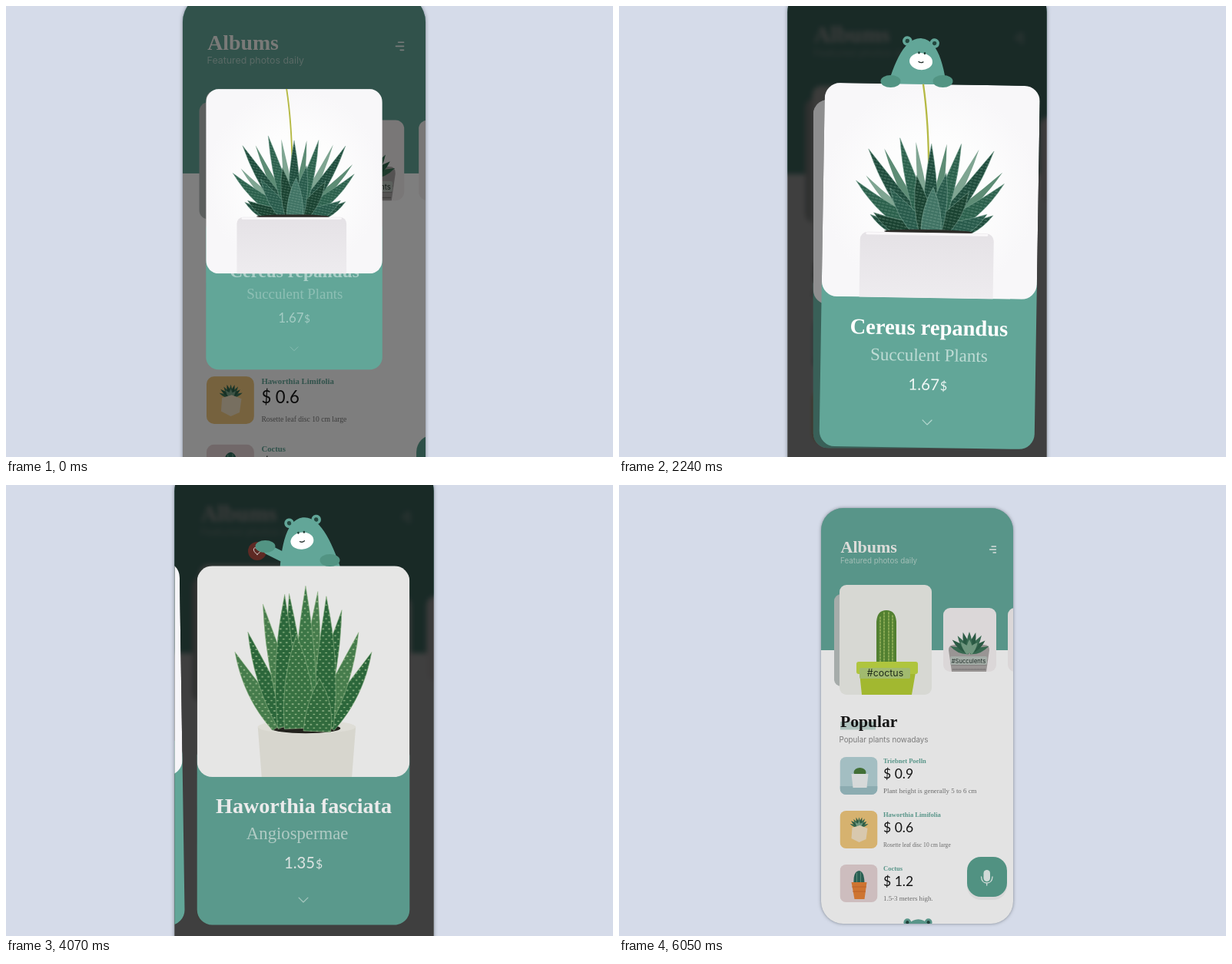
An HTML page that plays this animation: 790 px wide and 587 px high, repeating every 6150 ms.

```html
<!DOCTYPE html>
<html lang="en">
<head>
<meta charset="utf-8">
<title>Plant albums</title>
<style>
html, body { margin: 0; width: 100%; height: 100%; overflow: hidden; background: #d5dbe9; }
svg { display: block; }
.serif { font-family: "Liberation Serif", serif; }
.bold { font-weight: bold; }
.sans { font-family: Inter, sans-serif; }
.num { font-family: Lato, sans-serif; }
.mid { text-anchor: middle; }
.line { fill: none; stroke-linecap: round; stroke-linejoin: round; }
</style>
</head>
<body>
<svg id="stage" width="790" height="587" viewBox="0 0 790 587"></svg>
<script>
const LOOP = 6150, GREEN = '#62a698', PAW = '#529483';

// ---------- drawing helpers ----------
const rect = (x, y, w, h, fill, r = 0, more = '') =>
  `<rect x="${x}" y="${y}" width="${w}" height="${h}" rx="${r}" fill="${fill}" ${more}/>`;
const oval = (x, y, rx, ry, fill) =>
  `<ellipse cx="${x}" cy="${y}" rx="${rx}" ry="${ry}" fill="${fill}"/>`;
const path = (d, fill, more = '') => `<path d="${d}" fill="${fill}" ${more}/>`;
const line = (d, color, w, more = '') =>
  `<path class="line" d="${d}" stroke="${color}" stroke-width="${w}" ${more}/>`;
const text = (x, y, size, fill, cls, str) =>
  `<text x="${x}" y="${y}" font-size="${size}" fill="${fill}" class="${cls}">${str}</text>`;
const place = (x, y, s, art) => `<g transform="translate(${x} ${y}) scale(${s})">${art}</g>`;

let seed = 7;
const random = () => (seed = seed * 16807 % 2147483647) / 2147483647;

// A tapering leaf of base width w, bowed sideways by bow
function leaf(x0, y0, x1, y1, w, bow, fill, pattern) {
  const len = Math.hypot(x1 - x0, y1 - y0);
  const nx = (y0 - y1) / len, ny = (x1 - x0) / len;
  const at = (x, y, k) => `${(x + nx * k).toFixed(1)} ${(y + ny * k).toFixed(1)}`;
  const mx = (x0 + x1) / 2, my = (y0 + y1) / 2;
  const d = `M${at(x0, y0, -w / 2)}Q${at(mx, my, bow - w * .55)} ${x1.toFixed(1)} ${y1.toFixed(1)}` +
    `Q${at(mx, my, bow + w * .55)} ${at(x0, y0, w / 2)}Z`;
  return path(d, fill) + (pattern ? path(d, `url(#${pattern})`) : '');
}

// Leaves spread evenly over +-spread degrees, outer ones behind the middle
function fan({ x = 0, y, n, spread, len, w, foot = 0, bow = 0, fills, pattern }) {
  const list = Array.from({ length: n }, (_, i) => ({ i, k: n > 1 ? 2 * i / (n - 1) - 1 : 0 }));
  list.sort((a, b) => Math.abs(b.k) - Math.abs(a.k));
  return list.map(({ i, k }) => {
    const a = k * spread * Math.PI / 180, r = len(a) * (.95 + .1 * random());
    return leaf(x + k * foot, y, x + r * Math.sin(a), y - r * Math.cos(a), w, bow * k, fills[i % fills.length], pattern);
  }).join('');
}

// ---------- photos on the big cards, top centre at 0,0 ----------
const fullFan = a => 114 + 24 * Math.sin(2 * a) ** 2 - 42 * Math.sin(a) ** 4;
const rosette = rect(-140, 0, 280, 278, 'url(#wall)') +
  line('M-12 0Q-4 50 -3 115', '#b5b943', 2.3) +
  fan({ y: 186, n: 6, spread: 52, len: a => fullFan(a) * .94, w: 13, foot: 12, bow: 7, fills: ['#7fa592', '#5d8c75'] }) +
  `<g stroke="#86ad9b" stroke-opacity=".45" stroke-width=".7">` +
  fan({ y: 190, n: 9, spread: 76, len: fullFan, w: 20, foot: 16, bow: 13, fills: ['#1d4a3b', '#2a5f4b'], pattern: 'stripes' }) +
  fan({ y: 192, n: 6, spread: 72, len: () => 76, w: 23, foot: 14, bow: 10, fills: ['#18402f', '#27594a'], pattern: 'stripes' }) +
  leaf(1, 192, 3, 134, 26, 0, '#3f7263', 'stripes') + '</g>' +
  oval(-2, 192, 58, 3, '#2b2a26') + rect(-91, 193, 174, 110, 'url(#pot)', 10) +
  line('M-82 195H74', '#faf8fa', 3);

const gasteria = rect(-140, 0, 280, 278, '#f6f5f8') +
  path('M-48 188H75L60 258Q58 268 48 268H-22Q-32 268 -34 258Z', '#fdfcfe') +
  oval(13, 188, 61, 6, '#dcdadf') +
  `<g stroke="#86ad9b" stroke-opacity=".6" stroke-width="1">` +
  leaf(2, 190, -70, 90, 20, 22, '#1f5141', 'stripes') + leaf(-2, 186, 104, 74, 22, -32, '#24513f', 'stripes') +
  leaf(8, 184, 88, 162, 17, -13, '#1f4a3c', 'stripes') + leaf(10, 186, 84, 176, 14, 3, '#193f33') + '</g>' +
  Array.from({ length: 7 }, (_, i) => oval(-24 + i * 8, 187 + 3 * random(), 5, 4, '#fff')).join('');

const tallFan = a => 190 - 84 * Math.abs(a);
const haworthia = rect(-140, 0, 280, 278, '#f9f9f8') +
  path('M-60 212H69L63 290H-54Z', '#e9e8df') + oval(4.5, 212, 64.5, 9, '#f1f0e8') +
  oval(3, 214, 46, 6.5, '#26251f') + `<g stroke="#a8cc9c" stroke-opacity=".45" stroke-width=".7">` +
  fan({ y: 210, n: 8, spread: 43, len: tallFan, w: 25, foot: 30, bow: 9, fills: ['#4c8652', '#2f6f3f'], pattern: 'dots' }) +
  fan({ x: 3, y: 212, n: 3, spread: 9, len: () => 178, w: 30, foot: 22, bow: 5, fills: ['#2f6f3f', '#41804c'], pattern: 'dots' }) +
  leaf(-4, 214, -9, 90, 42, -1, '#3d7b48', 'dots') + leaf(18, 218, 21, 148, 36, 3, '#357342', 'dots') + '</g>';

const heart = line('M0 9C-16 -2 -9 -12 -3 -8Q-1 -7 0 -5Q1 -7 3 -8C9 -12 16 -2 0 9Z', '#fff', 1.6);

const card = (id, title, family, fx, price, art) =>
  `<g id="${id}"><g class="panel">${rect(-140, 230, 280, 243, GREEN, 20)}<g class="info">` +
  text(.5, 326, 28.5, '#fff', 'serif bold mid', title) +
  text(fx, 360, 23, '#bfdcd5', 'serif mid', family) +
  text(0, 398, 20.5, '#eef6f4', 'num mid', `${price}<tspan font-size="16" dx="1">$</tspan>`) +
  line('M-6 437L0 443L6 437', '#b5d8cf', 1.2) +
  `</g></g><g class="photo"><g clip-path="url(#frame)">${art}</g></g>` +
  rect(-140, 0, 280, 473, '#000', 20, 'class="dim" opacity="0"') +
  `<g class="like" opacity="0">${oval(16, 48, 25, 25, '#f3d5d4')}${place(16, 48, 1, heart)}</g></g>`;

// ---------- bear ----------
const ear = x => oval(x, 47, 6.3, 6.3, GREEN) + oval(x, 47, 2.7, 2.7, '#24483f');
const eye = x => oval(x, 61, 1.3, 1.6, '#1d3a33');
const head = ear(372.5) + ear(408) +
  path('M349 124C356 82 367 42 391 42C414 42 426 82 433 124Z', GREEN);
const face = oval(390, 72, 15, 11, '#fff') + eye(386.5) + eye(394) +
  line('M387 72.5Q390 74.5 393 72.5', '#24302d', 1.3);

// ---------- phone screen ----------
const succulent =
  fan({ y: 20, n: 9, spread: 76, len: () => 27, w: 9, bow: 4, fills: ['#3d7459', '#2f634b'] }) +
  fan({ y: 22, n: 3, spread: 40, len: () => 18, w: 9, fills: ['#7ba78c'] });

const thumbs = [
  rect(0, 38, 49, 11, '#9cbfc5') + oval(26, 20, 8, 6, '#4a7b3c') +
    path('M15 22H37L35 40H17Z', '#eef1f1'),
  place(25, 11, .45, succulent) + path('M16 22L26 19L36 23L34 37L25 41L15 36Z', '#f0dfc2'),
  path('M18 25Q17 9 25 8Q32 9 32 25Z', '#2f6a5c') + line('M22 11V24M27 10V24', '#6b9c86', 1) +
    path('M15 23H35L32 45H19Z', '#e58137') + line('M16 29H34M17 35H33', '#c9652a', .8)
];
const row = (i, bg, name, price, info, size) => place(287.5, 354 + 70 * i, 1,
  `<g clip-path="url(#thumb)">${rect(0, 0, 49, 49, bg)}${thumbs[i]}</g>` +
  text(56.5, 7.5, 8.5, GREEN, 'serif bold', name) +
  text(56.5, 27.5, 17.5, '#161616', 'num', `$ ${price}`) +
  text(56.5, 46.5, size, '#777', 'serif', info));
const smallPhoto = (x, art) => place(x, 160, 1, rect(0, 0, 69, 83, '#f4eff0', 9) + art);

const screen = rect(200, 0, 380, 700, '#fdfdfd') + rect(200, 0, 380, 215, GREEN) +
  text(288.5, 88, 22, '#f5f5f2', 'serif bold', 'Albums') +
  text(288, 102, 9.8, '#b4d3cb', 'sans', 'Featured photos daily') +
  line('M485 80H490.5M482.5 84H490.5M487 88H490.5', '#f2f7f6', 1.3) +
  rect(280, 142, 110, 120, '#b9bfbd', 9) +
  rect(287, 130, 120, 143, '#eff0eb', 9) +
  path('M335 238V178Q336 163 348 163Q360 163 361 178V238Z', '#5b8f37') +
  line('M340 172V232M345 166V232M351 166V232M356 170V232', '#a7c765', 1.6, 'stroke-dasharray="2 2"') +
  path('M313 244H386L381 273H316Z', '#b4cd35') + rect(309, 230, 80, 16, '#c3db45', 3) +
  rect(313, 238, 66, 14, '#b3cf7c', 2) +
  text(346.5, 249, 12.4, '#22301c', 'sans mid', '#coctus') +
  smallPhoto(422, path('M7 55Q7 48 14 48H54Q60 48 60 55L56 83H11Z', '#aaa6a5') +
    line('M10 68H57M11 74H56M12 80H55', '#7f7b7a', 1.2, 'stroke-dasharray="3 1"') +
    place(34, 37, .95, succulent) + rect(9, 63, 48, 11, '#b7c0ba', 2) +
    text(33, 71.5, 7.6, '#20302a', 'sans mid', '#Succulents')) +
  smallPhoto(506, '') +
  rect(288, 308, 46, 10.5, '#c3d9d4') +
  text(288, 315, 21.6, '#161616', 'serif bold', 'Popular') +
  text(286.5, 334.5, 9.8, '#888', 'sans', 'Popular plants nowadays') +
  row(0, '#b5d3d8', 'Triebnet Poelln', '0.9', 'Plant height is generally 5 to 6 cm', 8.9) +
  row(1, '#eec67c', 'Haworthia Limifolia', '0.6', 'Rosette leaf disc 10 cm large', 7.6) +
  row(2, '#e4d2d4', 'Coctus', '1.2', '1.5-3 meters high.', 8.9) +
  `<g id="mic">${rect(453, 488, 52, 52, '#000', 18, 'opacity=".05"')}${rect(453, 484, 52, 52, '#5aa291', 18)}` +
  rect(474.5, 501, 8.5, 15, '#e9f3f0', 4.2) +
  line('M471.5 510Q472 518 478.7 518Q485.5 518 486 510M478.7 518V521', '#e9f3f0', 1.3) + '</g>' +
  place(88.5, 533, .77, head);

document.getElementById('stage').innerHTML = `<defs>
  <clipPath id="shell">${rect(263, 30, 250, 541, '#000', 29)}</clipPath>
  <clipPath id="window">${rect(219.5, 0, 337.5, 587, '#000')}</clipPath>
  <clipPath id="frame">${rect(-140, 0, 280, 278, '#000', 20)}</clipPath>
  <clipPath id="thumb">${rect(0, 0, 49, 49, '#000', 8)}</clipPath>
  <radialGradient id="wall"><stop offset=".5" stop-color="#fdfdfd"/><stop offset="1" stop-color="#f8f7f9"/></radialGradient>
  <linearGradient id="pot" x2="0" y2="1"><stop stop-color="#e5e2e6"/><stop offset=".8" stop-color="#eeecef"/></linearGradient>
  <pattern id="stripes" width="5" height="4" patternUnits="userSpaceOnUse" patternTransform="rotate(12)">
    ${line('M.6 1H3.6', '#a5c6b5', .9, 'opacity=".5"')}</pattern>
  <pattern id="dots" width="8" height="9" patternUnits="userSpaceOnUse">
    ${oval(2, 2, 1.5, .8, '#c3dfb0')}${oval(6, 6.5, 1.4, .8, '#a9cf98')}</pattern>
</defs>
<g id="phone">
  ${rect(263, 30, 250, 541, '#8a93a0', 29, 'style="filter:drop-shadow(0 0 2px rgba(40,50,60,.5))"')}
  <g clip-path="url(#shell)"><g id="screen">${screen}</g>${rect(255, 20, 266, 560, '#000', 0, 'id="shade"')}</g>
</g>
<g clip-path="url(#window)">
  <g id="bear">${head}<g id="face">${face}</g></g>
  <g id="stub">${rect(-140, 0, 280, 473, '#3f6a61', 20)}</g>
  ${card('haworthia', 'Haworthia fasciata', 'Angiospermae', -8, '1.35', haworthia)}
  ${card('gasteria', 'Gasteria variegata', 'Asphodelaceae', -8, '1.45', gasteria)}
  ${card('cereus', 'Cereus repandus', 'Succulent Plants', 1, '1.67', rosette)}
</g>
<g id="caught">${oval(0, 0, 25, 25, '#5e2a24')}${heart}</g>
<g id="arms">
  ${line('M359 93L341 84', GREEN, 13, 'id="reach"')}
  ${line('M427 92L437 89', GREEN, 12, 'id="wave"')}
  <g id="pawL">${oval(353.5, 98, 13, 8, PAW)}</g><g id="pawR">${oval(417.5, 98, 13, 8, PAW)}</g>
</g>`;

// ---------- motion ----------
const clamp = u => Math.min(1, Math.max(0, u));
const mix = (a, b, k) => a + (b - a) * k;
const found = {};
const part = sel => found[sel] = found[sel] || document.querySelector(sel);
const move = (sel, x, y, s = 1, r = 0) =>
  part(sel).setAttribute('transform', `translate(${x} ${y}) rotate(${r}) scale(${s})`);
const fade = (sel, k) => part(sel).setAttribute('opacity', clamp(k));

// The top card grows out of the album photo (open 0) to full size (open 1)
function frontCard(id, open, dx, lift) {
  move(id, mix(347, 388, open) + dx, mix(130, 98, open) + 4 * lift, mix(.43, 1, open), lift * .8 + dx * .0055);
  part(id + ' .panel').setAttribute('transform', `translate(0 ${-195 * (1 - open) ** 1.7})`);
  part(id + ' .photo').setAttribute('transform', `scale(1 ${mix(1.17, 1, open)})`);
  fade(id + ' .info', open ** 2);
  fade(id + ' .like', -dx / 110);
  fade(id + ' .dim', 0);
}

// A waiting card comes forward as the one above it is pulled aside
function backCard(id, pulled, bright, settled) {
  const near = Math.abs(pulled) / (Math.abs(pulled) + 20);
  move(id, mix(387, 388, settled), mix(141 - 38 * near, 98, settled), mix(.925 + .067 * near, 1, settled));
  fade(id + ' .dim', .5 * (1 - bright) * (1 - .3 * near));
}

function draw(t) {
  const ease = (a, b) => { const u = clamp((t - a) / (b - a)); return u * u * (3 - 2 * u); };
  const span = (a, b, c, d) => ease(a, b) * (1 - ease(c, d));

  // phone zoom: the opening is already under way when the loop starts
  const zoom = (1 - (1 - clamp((t + 321) / 861)) ** 3) * (1 - ease(5540, 6050));
  const open = zoom ** 1.35;
  part('#phone').setAttribute('transform', `translate(388 204) scale(${1 + .35 * zoom}) translate(-388 -204)`);
  fade('#shade', .1 + .65 * zoom ** 1.7);
  part('#screen').style.filter = `blur(${(2.3 * clamp(4 * zoom - 3)).toFixed(2)}px)`;
  move('#mic', 67 * zoom, 0);

  // first card: left, right, hold, then thrown left; second: a short pull and thrown left
  const dx1 = -152 * span(1200, 1600, 1880, 2260) + 252 * ease(2120, 2800) - 823 * ease(3100, 3620);
  const dx2 = 45 * ease(3640, 3800) - 460 * ease(3800, 4200);
  const second = t >= 3640, third = t >= 4220;

  frontCard('#cereus', open, dx1, ease(1200, 1400));
  fade('#cereus', t < 3640);
  if (second) frontCard('#gasteria', 1, dx2, ease(3640, 3800));
  else backCard('#gasteria', dx1, ease(3370, 3640), ease(3480, 3640));
  fade('#gasteria', third ? 0 : ease(400, 600));
  if (third) frontCard('#haworthia', open, 0, 0);
  else backCard('#haworthia', dx2, ease(3800, 4190), ease(4070, 4220));
  fade('#haworthia', second ? open * 5 : 0);
  move('#stub', 388, 141, .93);
  fade('#stub', span(4190, 4400, 5300, 5480));

  // the bear hops up, leans towards the moving card and ducks at the end
  const up = ease(690, 1150), duck = ease(5200, 5430);
  const toward = d => d / (Math.abs(d) + 12);
  const lean = toward(dx1) * (1 - ease(3520, 3680)) + toward(dx2) * (1 - ease(4150, 4400));
  const lower = 75 * (1 - up + duck) - 25 * up * Math.sin(Math.PI * up);
  part('#bear').setAttribute('transform', `translate(0 ${lower}) rotate(${8 * lean} 391 78)`);
  fade('#bear', t > 600 && t < 5430);
  move('#face', 4 * lean, 0);

  // paws, and the heart caught from the first card
  const reach = span(3400, 3580, 4150, 4300), wave = span(5080, 5170, 5180, 5290);
  const flight = ease(3450, 3800);
  fade('#arms', span(560, 650, 5300, 5410));
  move('#pawL', -16 * reach, -18 * reach + 14 * duck);
  move('#pawR', 4 + 12 * wave, -12 * wave + 14 * duck);
  fade('#reach', reach);
  fade('#wave', wave);
  move('#caught', mix(230, 327, flight), mix(135, 86, flight), mix(.9, .48, flight));
  fade('#caught', span(3450, 3540, 4100, 4200));
}

const start = performance.now();
function tick(now) {
  draw(Math.max(0, now - start) % LOOP);
  requestAnimationFrame(tick);
}
draw(0);
requestAnimationFrame(tick);
</script>
</body>
</html>
```
